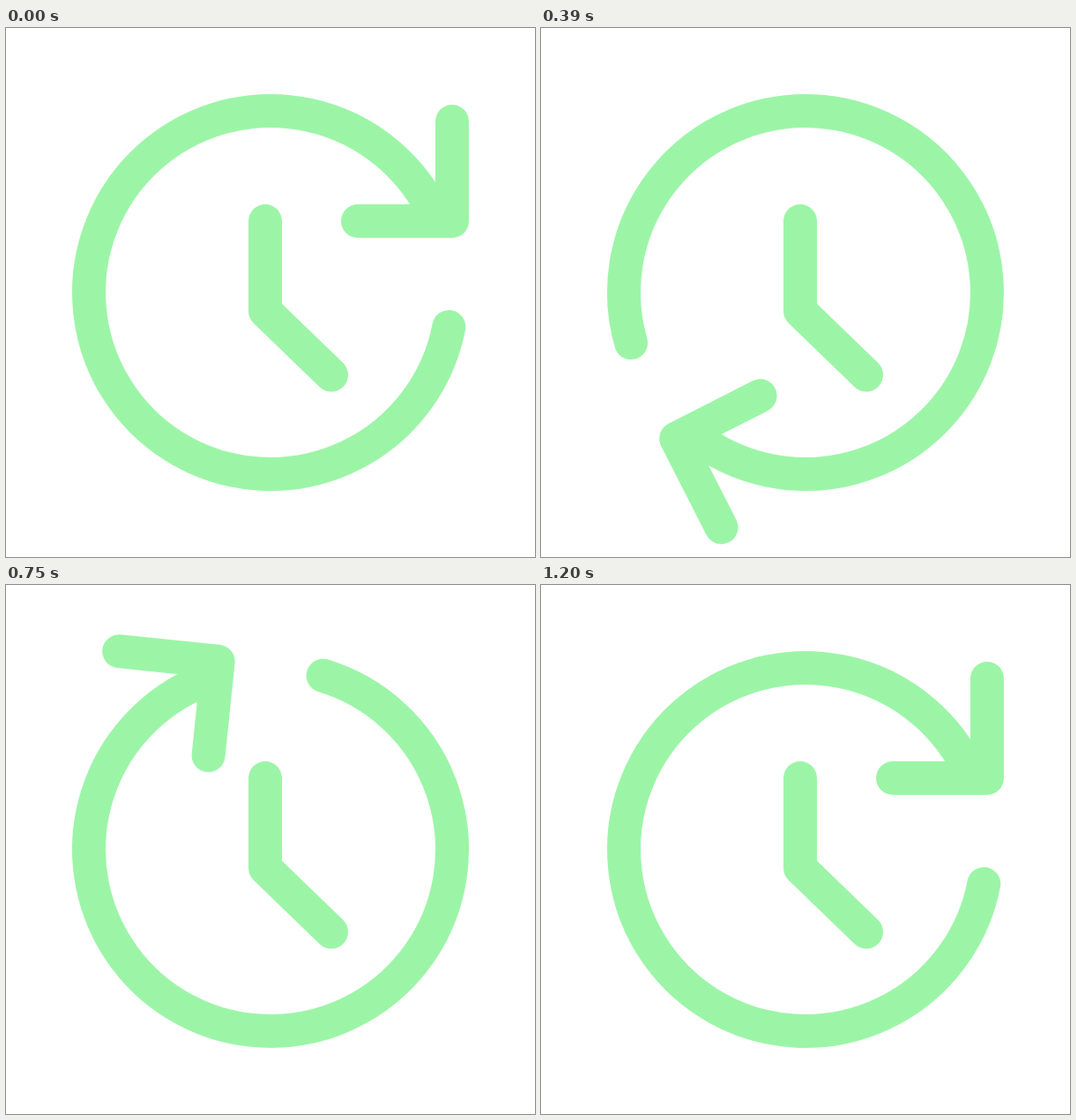
An HTML page that plays this animation: 600 px wide and 600 px high, repeating every 1.23 s.

```html
<!DOCTYPE html>
<html>
<head>
<meta charset="utf-8">
<style>
  html, body { margin: 0; height: 100%; overflow: hidden; background: #fff; }
  svg { display: block; width: 100%; height: 100%; }
  path { fill: none; stroke: #9cf5a7; stroke-width: 38; stroke-linecap: round; stroke-linejoin: round; }
</style>
</head>
<body>
<svg viewBox="0 0 600 600">
  <path d="M294 219V321L369 393.5"/>
  <g id="arrow">
    <path d="M488.2 216.2A206 206 0 1 0 502.3 339"/>
    <path d="M506 106V219H399"/>
  </g>
</svg>
<script>
  const STEP = 30, LOOP = 1230;
  // [step, degrees]; the outer two continue the turn past the loop ends
  const keys = [[-4, -30.7], [0, 0], [6, 66], [13, 153], [17, 206.4], [25, 275.9],
                [33, 312.8], [36, 329.3], [40, 360], [46, 426]];
  const arrow = document.getElementById('arrow');

  const rate = i => (keys[i + 1][1] - keys[i][1]) / (keys[i + 1][0] - keys[i][0]);

  function slope(i) {
    const before = keys[i][0] - keys[i - 1][0], after = keys[i + 1][0] - keys[i][0];
    return (rate(i - 1) * after + rate(i) * before) / (before + after);
  }

  // Cubic Hermite curve through the keys
  function angleAt(step) {
    let i = 1;
    while (i < keys.length - 3 && step >= keys[i + 1][0]) i++;
    const [x0, y0] = keys[i], [x1, y1] = keys[i + 1];
    const h = x1 - x0, u = (step - x0) / h, v = 1 - u;
    return y0 * v * v * (1 + 2 * u) + y1 * u * u * (3 - 2 * u)
         + h * u * v * (slope(i) * v - slope(i + 1) * u);
  }

  function draw() {
    const step = Math.floor(performance.now() % LOOP / STEP);
    arrow.setAttribute('transform', `rotate(${angleAt(step)} 300 300)`);
    requestAnimationFrame(draw);
  }
  draw();
</script>
</body>
</html>
```
